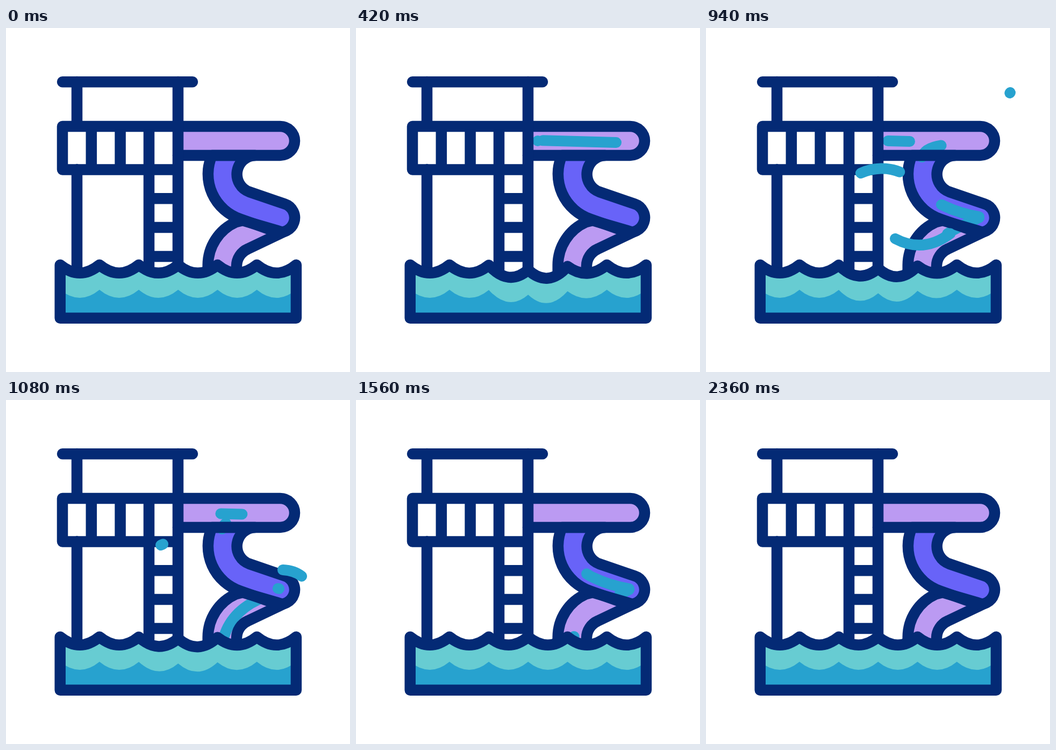
Recreate the animation shown at these times as an HTML page. Size 640 by 640 pixels, loop 2.4 s.

```html
<!DOCTYPE html>
<html lang="en">
<head>
<meta charset="utf-8">
<title>Water slide</title>
<style>
  html, body { margin: 0; height: 100%; overflow: hidden; background: #fff; }
  svg { display: block; width: 100vw; height: 100vh; }
  path { fill: none; stroke-width: 20.5; stroke-linecap: round; stroke-linejoin: round; }
  .line { stroke: #042a75; }
  .water path { stroke: #27a2cf; stroke-width: 20; }
</style>
</head>
<body>
<svg viewBox="0 0 640 640">
  <g id="fills"></g>
  <g id="streams" class="water"></g>
  <g id="outlines"></g>
  <path id="tower" class="line"/>
  <path id="shallow" style="fill:#67ccd2"/>
  <path id="deep" style="fill:#27a2cf"/>
  <path id="rim" class="line"/>
  <g id="splashes" class="water"></g>
</svg>
<script>
const LOOP = 2400;
const $ = id => document.getElementById(id);
const clamp = x => Math.min(1, Math.max(0, x));

function addPath(parent, d, attrs) {
  const path = document.createElementNS('http://www.w3.org/2000/svg', 'path');
  path.setAttribute('d', d);
  for (const name in attrs) path.setAttribute(name, attrs[name]);
  return $(parent).appendChild(path);
}

function drawTower() {
  let d = 'M105 100.3H347M132 100V183M320 100V455M105 183H320V263.5H105ZM132 263V450M266 183V455';
  for (let i = 1; i < 3; i++) d += `M${105 + 53.8 * i} 183v80`;
  for (let i = 1; i < 4; i++) d += `M266 ${263.5 + 53.8 * i}h54`;
  $('tower').setAttribute('d', d);
}

function addTube(color, d) {
  addPath('fills', d, { style: `fill:${color}` });
  addPath('outlines', d, { class: 'line' });
}

addTube('#bb9af2', 'M375.7 462V442A88 88 0 0 1 428 361L440 358L515 380L450 411A35 35 0 0 0 429 443V462');
addTube('#6863f8', 'M383 237A88.3 88.3 0 0 0 436 355.4L501.4 378.6A27 27 0 0 0 518.6 327.4L453 305A35 35 0 0 1 464 237Z');
addTube('#bb9af2', 'M320 183H510A27 27 0 0 1 510 237H320');

// The head runs along the path from start to full, the tail follows from drain to end.
const flows = [];
function flow(parent, d, start, full, drain, end) {
  flows.push({ path: addPath(parent, d, { pathLength: 1 }), start, full, drain, end });
}
const stream = (...args) => flow('streams', ...args);
const splash = (...args) => flow('splashes', ...args);

const bend = 'M470 216C432 217 407 222 402 240';
const middle = 'M401 240C396 285 410 317 443 331Q472 345 508 351';
const lower = 'M508 353L470 371Q412 398 402 455';

stream('M338 209L484 213', 100, 420, 390, 865);
stream('M338 210h.1', 100, 101, 860, 861);
stream('M338 210L508 214', 846, 1240, 940, 1330);
stream(bend, 500, 620, 795, 1140);
stream(bend, 1170, 1400, 1320, 1450);
stream(middle, 610, 827, 740, 1085);
stream(middle, 1310, 1500, 1416, 1693);
stream(lower, 860, 1050, 1000, 1329);
stream(lower, 1200, 1440, 1300, 1590);
stream(lower, 1520, 1850, 1640, 1920);

splash('M506 160Q540 157 556 135L566 120', 580, 793, 745, 944);
splash('M426 305Q462 288 493 312', 620, 740, 740, 860);
splash('M387 290C370 262 325 253 288 270', 735, 930, 870, 1090);
splash('M455 382Q405 420 352 392', 820, 940, 940, 1080);
splash('M515 316Q555 318 568 354', 1000, 1150, 1100, 1263);

function drawFlow({ path, start, full, drain, end }, t) {
  const head = clamp((t - start) / (full - start));
  const tail = clamp((t - drain) / (end - drain));
  path.style.display = t > start && t < end ? '' : 'none';
  path.style.strokeDasharray = `${Math.max(head - tail, .001)} 3`;
  path.style.strokeDashoffset = -tail;
}

// Scalloped pool surface; a smooth dent sinks the part around x = 327.
function wave(y, depth) {
  const left = 100.7, step = 73.2;
  const dent = x => depth * Math.cos(clamp(Math.abs(x - 327) / 82) * Math.PI / 2);
  let d = `M${left} ${y}`;
  for (let i = 0; i < 6; i++) {
    const mid = left + step * (i + .5), next = left + step * (i + 1);
    d += `Q${mid} ${y + 30 + 1.7 * dent(mid)} ${next} ${y + dent(next)}`;
  }
  return d + `V539.7H${left}Z`;
}

function drawPool(t) {
  const depth = 10.5 * Math.sin(Math.PI * clamp(t / 1200));
  const surface = wave(440.8, depth);
  $('shallow').setAttribute('d', surface);
  $('deep').setAttribute('d', wave(487, depth));
  $('rim').setAttribute('d', surface);
}

function frame() {
  const t = performance.now() % LOOP;
  flows.forEach(f => drawFlow(f, t));
  drawPool(t);
  requestAnimationFrame(frame);
}

drawTower();
frame();
</script>
</body>
</html>
```
